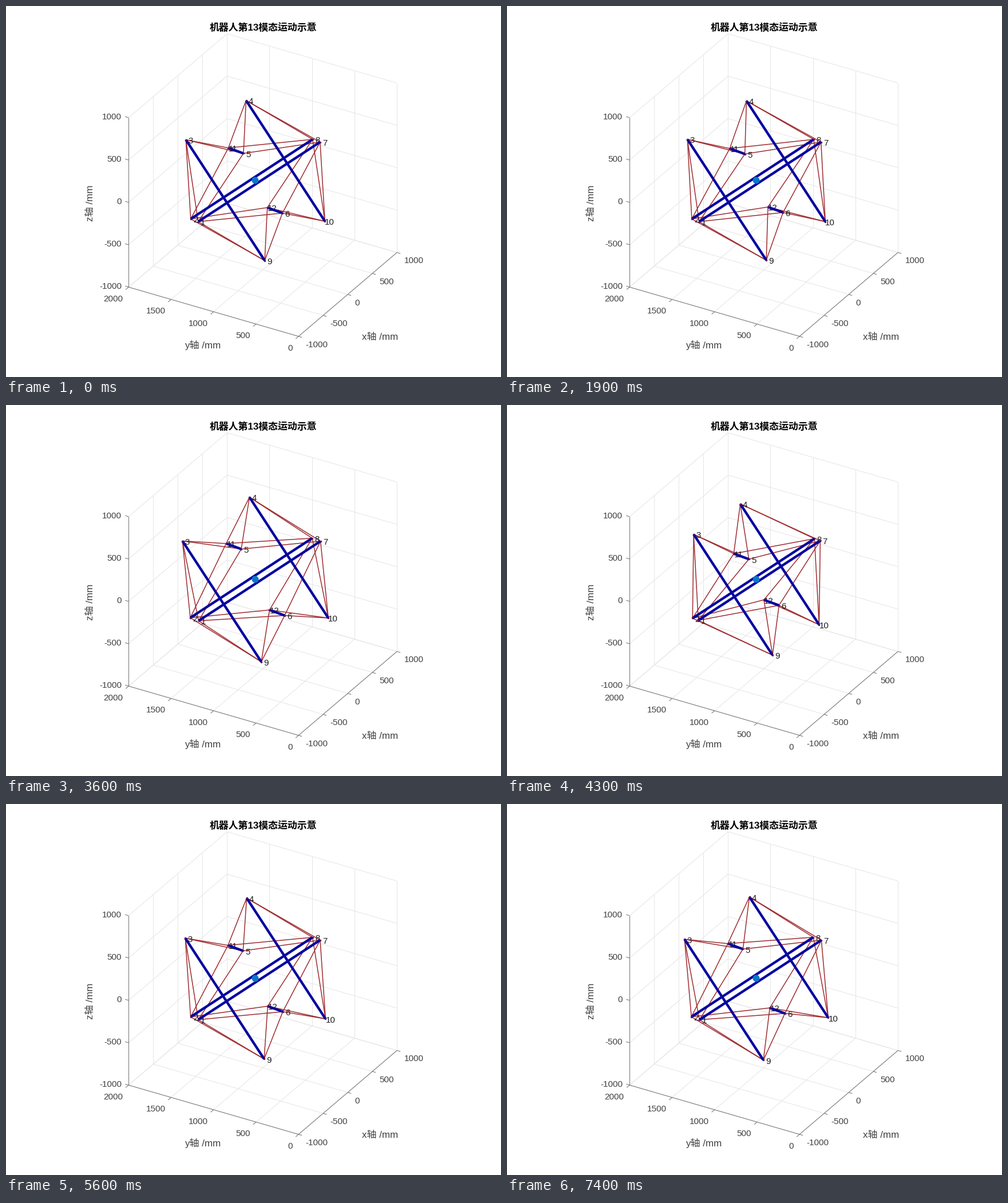
These frames come from a looping animation (865 px wide and 648 px high, 7.5 s). A matplotlib script:

```python
import numpy as np
import matplotlib.pyplot as plt
from matplotlib.animation import FuncAnimation
from matplotlib.collections import LineCollection

W, H, DPI = 865, 648, 100
FRAMES, STEP, CYCLES = 75, 100, 4
PT = 72 / DPI
RED, BLUE, DOT = "#9e2a2e", "#0606a0", "#0b76c8"
AXIS, GRID, TEXT = "#7c7c7c", "#e5e5e5", "#404040"

plt.rcParams["font.family"] = ["Liberation Sans", "Noto Sans CJK JP"]

# Axes box on the stage: origin and edge vectors
ORIGIN = np.array([214.2, 491])
EX, EY, EZ = np.array([[172, -146.5], [297, 86], [0, -296]])

# Robot on the stage: centre and the three perpendicular bar directions
CENTRE = np.array([435.8, 304.8])
BAR_DIRS = np.array([[213, -139], [137.8, 211], [-26.4, -9.6]])

fig = plt.figure(figsize=(W / DPI, H / DPI), dpi=DPI, facecolor="white")
ax = fig.add_axes([0, 0, 1, 1])
ax.set_xlim(0, W)
ax.set_ylim(H, 0)
ax.axis("off")


def project(a, b, c):
    return ORIGIN + a * EX + b * EY + c * EZ


def lines(segs, color, width, z):
    col = LineCollection(segs, colors=color, linewidths=width * PT, zorder=z,
                         capstyle="butt")
    ax.add_collection(col)
    return col


def label(x, y, s, size=15.3, ha="center", color=TEXT, **kw):
    """Text whose digits are centred vertically on y."""
    return ax.text(x, y + .35 * size, s, fontsize=size * PT, ha=ha,
                   va="baseline", color=color, **kw)


def draw_box():
    grid, edges = [], []
    for k in np.linspace(0, 1, 5):
        grid += [
            (project(k, 0, 0), project(k, 1, 0)),
            (project(0, k, 0), project(1, k, 0)),
            (project(1, k, 0), project(1, k, 1)),
            (project(k, 0, 0), project(k, 0, 1)),
            (project(1, 0, k), project(1, 1, k)),
            (project(0, 0, k), project(1, 0, k)),
        ]
        value = int(2000 * k - 1000)
        px, py, pz = project(k, 1, 0), project(0, k, 0), project(0, 0, k)
        edges += [(px, px + (6, 1.8)), (py, py + (-5, 4.3)),
                  (pz, pz + (-6, -1.8))]
        label(px[0] + 12.5, px[1] + 13.5, str(value), ha="left")
        label(py[0] - 10, py[1] + 19.5, str(1000 - value), ha="right")
        label(pz[0] - 12, pz[1] - 2.2, str(value), ha="right")
    edges += [(project(0, 0, 0), project(0, 0, 1)),
              (project(0, 0, 0), project(0, 1, 0)),
              (project(0, 1, 0), project(1, 1, 0))]
    lines(grid, GRID, 1, 1)
    lines(edges, AXIS, 1.1, 2)


def nodes(gap):
    """Twelve bar ends in bar lengths; parallel bars lie 2 * gap apart."""
    n = np.arange(12)
    axis = n % 6 // 2
    pts = np.zeros((12, 3))
    pts[n, axis] = n // 6 - .5
    pts[n, axis - 1] = gap * (n % 2 * 2 - 1)
    return pts


def find_cables():
    """Each bar end is tied to its nearest ends on the crossing bars."""
    rest = nodes(.25)
    dist = np.linalg.norm(rest[:, None] - rest, axis=2)
    return np.argwhere(np.triu((dist > .55) & (dist < .7)))


BARS = np.array([(n, n + 6) for n in range(6)])
CABLES = find_cables()

draw_box()
label(449, 37, "机器人第13模态运动示意", 16.9, color="black", weight="bold")
label(343.5, 592.5, "y轴 /mm", 17)
label(654, 577, "x轴 /mm", 17)
ax.text(152, 344, "z轴 /mm", fontsize=17 * PT, color=TEXT, rotation=90,
        rotation_mode="anchor", ha="center", va="baseline")

cables = lines([], RED, 1.5, 3)
tags = [label(0, 0, str(n + 1), 15, color="#1c1c1c", zorder=4)
        for n in range(12)]
bars = lines([], BLUE, 4.4, 5)
tips = ax.scatter([], [], s=(3.4 * PT) ** 2, color="#5a1060", lw=0, zorder=6)
ax.plot(435.3, 304.3, "o", ms=12 * PT, mfc=DOT, mec="none", zorder=7)


def update(i):
    gap = .247 - .058 * np.sin(2 * np.pi * CYCLES * i / FRAMES)
    pos = CENTRE + nodes(gap) @ BAR_DIRS
    cables.set_segments(pos[CABLES])
    bars.set_segments(pos[BARS])
    tips.set_offsets(pos)
    for tag, (x, y) in zip(tags, pos):
        tag.set_position((x + 8.5, y + 6.3))
    return [cables, bars, tips, *tags]


anim = FuncAnimation(fig, update, frames=FRAMES, interval=STEP,
                     repeat=True, repeat_delay=0, blit=False)
plt.show()
```
